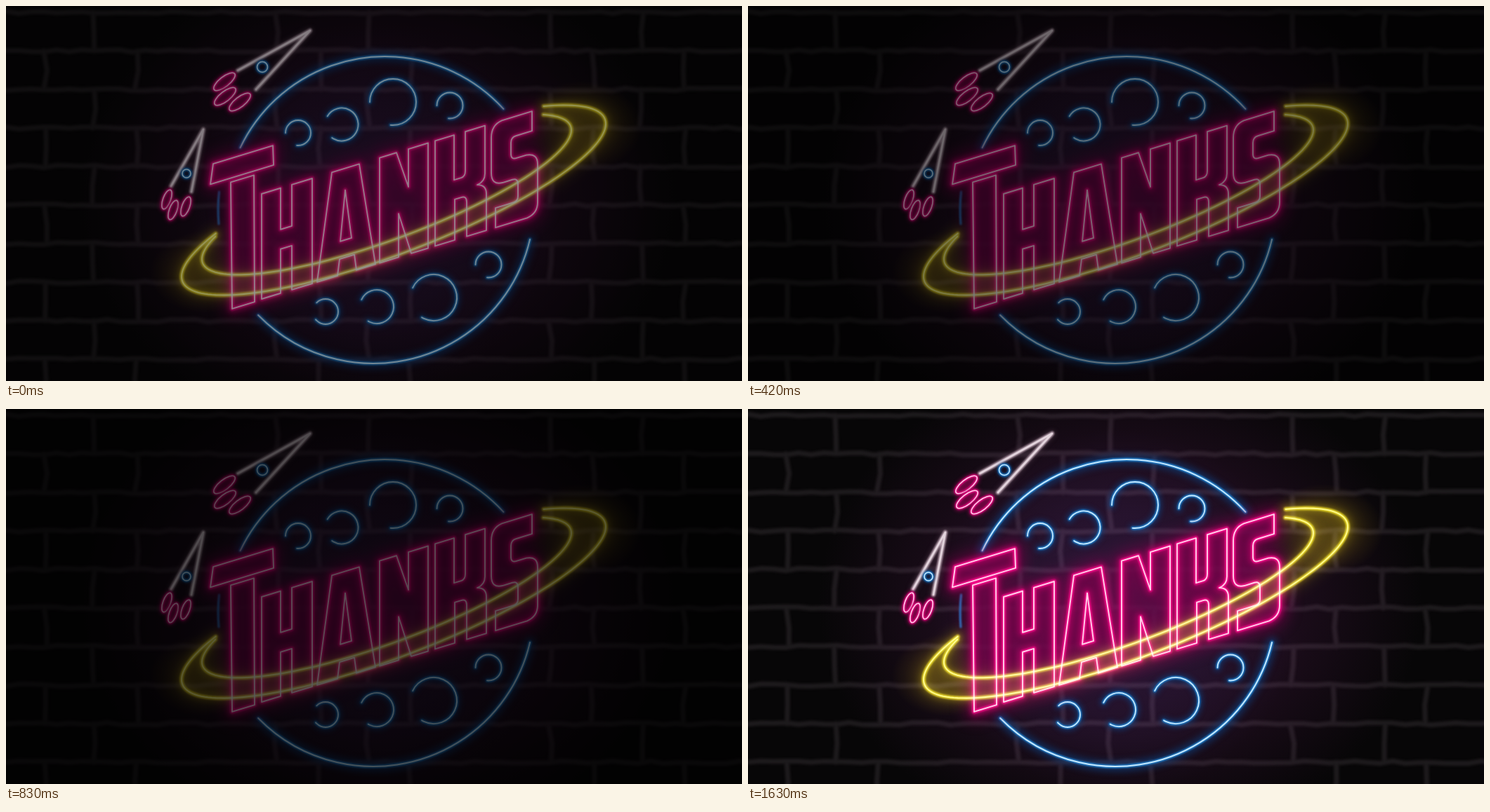
An HTML page with a canvas for the animation above (2020 ms loop, 1048 by 535 pixels).

```html
<!DOCTYPE html>
<html lang="en">
<head>
<meta charset="utf-8">
<title>Neon thanks</title>
<style>
html, body { margin: 0; width: 100%; height: 100%; overflow: hidden; background: #000; }
canvas { display: block; width: 1048px; height: 535px; }
</style>
</head>
<body>
<canvas id="stage" width="1048" height="535"></canvas>
<script>
const W = 1048, H = 535, LOOP = 2020, RAD = Math.PI / 180;
const view = document.getElementById('stage').getContext('2d');
const sign = document.createElement('canvas');
sign.width = W;
sign.height = H;
const g = sign.getContext('2d');

// Start time and brightness of each flicker step
const flicker = [
  [0, 0.58], [150, 0.78], [270, 1], [420, 0.48],
  [550, 0.62], [700, 0.74], [830, 0.35], [970, 1]
];

const pink = { halo: '#b0005e', tube: '#f20c88', core: '#ffd0ea' };
const blue = { halo: '#0b4486', tube: '#2183d2', core: '#c4e8ff' };
const gold = { halo: '#5c5000', tube: '#dcc416', core: '#fff27c' };
const white = { halo: '#57404f', tube: '#b7a0ae', core: '#e2d4dc' };

// Upright letter shapes on a level line; the word is sheared as one
const SLOPE = -0.306;
const letters = [
  [291, 'M4 -64H89L90 -36H0ZM29 -30H62L63 151H31Z'],
  [364, 'M0 0H27V59H43V0H72V150H43V87H27V150H0Z'],
  [443, 'M21 0H60L83 150H56L53 127H32L29 150H0ZM40 31L49 102H33Z'],
  [532, 'M0 0H24L41 54V0H69V150H45L27 88V150H0Z'],
  [611, 'M0 0H27V64H37Q43 64 43 56V0H71V68Q71 80 60 81Q73 85 73 98V150H45V101Q45 92 37 92H28V150H0Z'],
  [691, 'M0 20Q0 2 15 0H58V28H35Q28 28 28 36V52Q28 60 36 60H50Q66 62 66 78V132Q66 148 51 150H6V122H32Q38 122 38 115V98Q38 89 30 89H16Q0 88 0 70Z']
];

let seed = 7;
function random() {
  seed = (seed * 16807) % 2147483647;
  return seed / 2147483647;
}
const jitter = size => (random() - 0.5) * 2 * size;

function arc(x, y, r, from = 0, to = 360) {
  const p = new Path2D();
  p.arc(x, y, r, from * RAD, to * RAD);
  return p;
}

function oval(x, y, rx, ry, deg) {
  const p = new Path2D();
  p.ellipse(x, y, rx, ry, deg * RAD, 0, Math.PI * 2);
  return p;
}

// Points of an ellipse whose long axis rises by `lift` over its half width
function ringPoints(cx, cy, half, lift, depth, from, to) {
  const pts = [];
  for (let a = from; a <= to; a += 2) {
    const c = Math.cos(a * RAD), s = Math.sin(a * RAD);
    pts.push([cx + half * c, cy - lift * c + depth * s]);
  }
  return pts;
}

function polyline(pts) {
  const p = new Path2D();
  pts.forEach(([x, y]) => p.lineTo(x, y));
  return p;
}

function stroke(path, color, width, blur = 0, alpha = 1) {
  g.save();
  g.lineCap = g.lineJoin = 'round';
  g.filter = blur ? `blur(${blur}px)` : 'none';
  g.globalAlpha = alpha;
  g.strokeStyle = color;
  g.lineWidth = width;
  g.stroke(path);
  g.restore();
}

function fill(path, color, blur, alpha) {
  g.save();
  g.filter = `blur(${blur}px)`;
  g.globalAlpha = alpha;
  g.fillStyle = color;
  g.fill(path);
  g.restore();
}

function neon(path, tone, width, core, spread) {
  stroke(path, tone.halo, spread, spread / 3, 0.55);
  stroke(path, tone.tube, width, 0.8);
  stroke(path, tone.core, core, 0.3);
}

function glow(x, y, rx, ry, rgb, alpha) {
  g.save();
  g.translate(x, y);
  g.scale(rx, ry);
  const fade = g.createRadialGradient(0, 0, 0, 0, 0, 1);
  fade.addColorStop(0, `rgba(${rgb},${alpha})`);
  fade.addColorStop(0.55, `rgba(${rgb},${alpha * 0.65})`);
  fade.addColorStop(1, `rgba(${rgb},0)`);
  g.fillStyle = fade;
  g.fillRect(-1, -1, 2, 2);
  g.restore();
}

function drawWall() {
  g.fillStyle = '#070607';
  g.fillRect(0, 0, W, H);
  const mortar = new Path2D();
  for (let row = 0; row < 10; row++) {
    const y = 9 + row * 55;
    mortar.moveTo(-10, y);
    for (let x = 0; x < W + 20; x += 18) mortar.lineTo(x, y + jitter(1.8));
    // Long and short bricks alternate, shifted on every other course
    const [start, gap] = row % 2 ? [56, 130] : [125, 260];
    for (let x = start; x < W; x += 390) {
      for (const joint of [x, x + gap]) {
        mortar.moveTo(joint + jitter(3), y);
        mortar.lineTo(joint + jitter(3), y + 28);
        mortar.lineTo(joint + jitter(3), y + 55);
      }
    }
  }
  stroke(mortar, '#1c191b', 8, 1.6, 0.9);
  stroke(mortar, '#232022', 3, 1.2, 0.5);
  g.globalCompositeOperation = 'lighter';
  glow(530, 275, 430, 350, '46,14,44', 0.72);
  glow(525, 290, 260, 260, '18,18,46', 0.45);
  glow(820, 172, 85, 65, '80,68,0', 0.5);
  glow(280, 380, 75, 58, '70,60,0', 0.5);
  g.globalCompositeOperation = 'source-over';
}

function drawMoon() {
  neon(arc(539.5, 300, 228, 205.4, 317.8), blue, 4.8, 2, 15);
  neon(arc(523, 281, 229, 13.1, 135.7), blue, 4.8, 2, 15);
  stroke(new Path2D('M303.5 265Q301 288 303 311'), blue.tube, 3, 0.8);
  const crater = (x, y, r, turn) => neon(arc(x, y, r, 180 + turn, 456 + turn), blue, 4.4, 1.8, 11);
  crater(416, 181, 18, 0);
  crater(478, 169, 23.5, 30);
  crater(551, 137, 33, 0);
  crater(632, 142, 18.5, 0);
  crater(455, 436, 18, 45);
  crater(528, 429, 24, 25);
  crater(609, 416, 33, 25);
  crater(687, 369, 18.5, 0);
}

function drawWord() {
  const word = new Path2D();
  for (const [x, shape] of letters) {
    word.addPath(new Path2D(shape), new DOMMatrix([1, SLOPE, 0, 1, x, 268 + SLOPE * (x - 364)]));
  }
  fill(word, '#5e0a44', 5, 0.75);
  stroke(word, '#8a0050', 26, 10, 0.5);
  stroke(word, '#c8006c', 12, 3.5, 0.6);
  stroke(word, pink.tube, 5.6, 0.9);
  stroke(word, pink.core, 1.9);
}

function drawRing() {
  const outer = ringPoints(552, 277, 302, 109, 80.5, -45, 213);
  const inner = ringPoints(542, 269, 263, 92, 68, -32, 203);
  g.globalCompositeOperation = 'screen';
  fill(polyline([...outer, ...inner.slice().reverse()]), '#8c7800', 2, 0.22);
  for (const pts of [outer, inner]) {
    const line = polyline(pts);
    stroke(line, gold.halo, 22, 8, 0.3);
    neon(line, gold, 5.4, 1.8, 11);
  }
  g.globalCompositeOperation = 'source-over';
}

function drawRocket(body, port, flames, rx, ry, deg) {
  neon(new Path2D(body), white, 6, 2.6, 9);
  neon(arc(...port), blue, 3.8, 1.6, 7);
  for (const [x, y] of flames) {
    const flame = oval(x, y, rx, ry, deg);
    fill(flame, '#7a0646', 1, 0.7);
    neon(flame, pink, 4, 1.6, 8);
  }
}

function paint() {
  const t = performance.now() % LOOP;
  const [, level] = flicker.findLast(([start]) => t >= start);
  view.globalAlpha = 1;
  view.fillStyle = '#000';
  view.fillRect(0, 0, W, H);
  view.globalAlpha = level;
  view.drawImage(sign, 0, 0);
  requestAnimationFrame(paint);
}

drawWall();
drawMoon();
drawWord();
drawRing();
drawRocket('M330 92L433 35L356 119', [365, 87, 7.5],
  [[311, 108], [312, 129], [333, 137]], 18.5, 7, -38);
drawRocket('M235 257L281 176L264 265', [257, 239, 6],
  [[229, 276], [238, 291], [256, 286]], 14.5, 5.5, -70);
paint();
</script>
</body>
</html>
```
